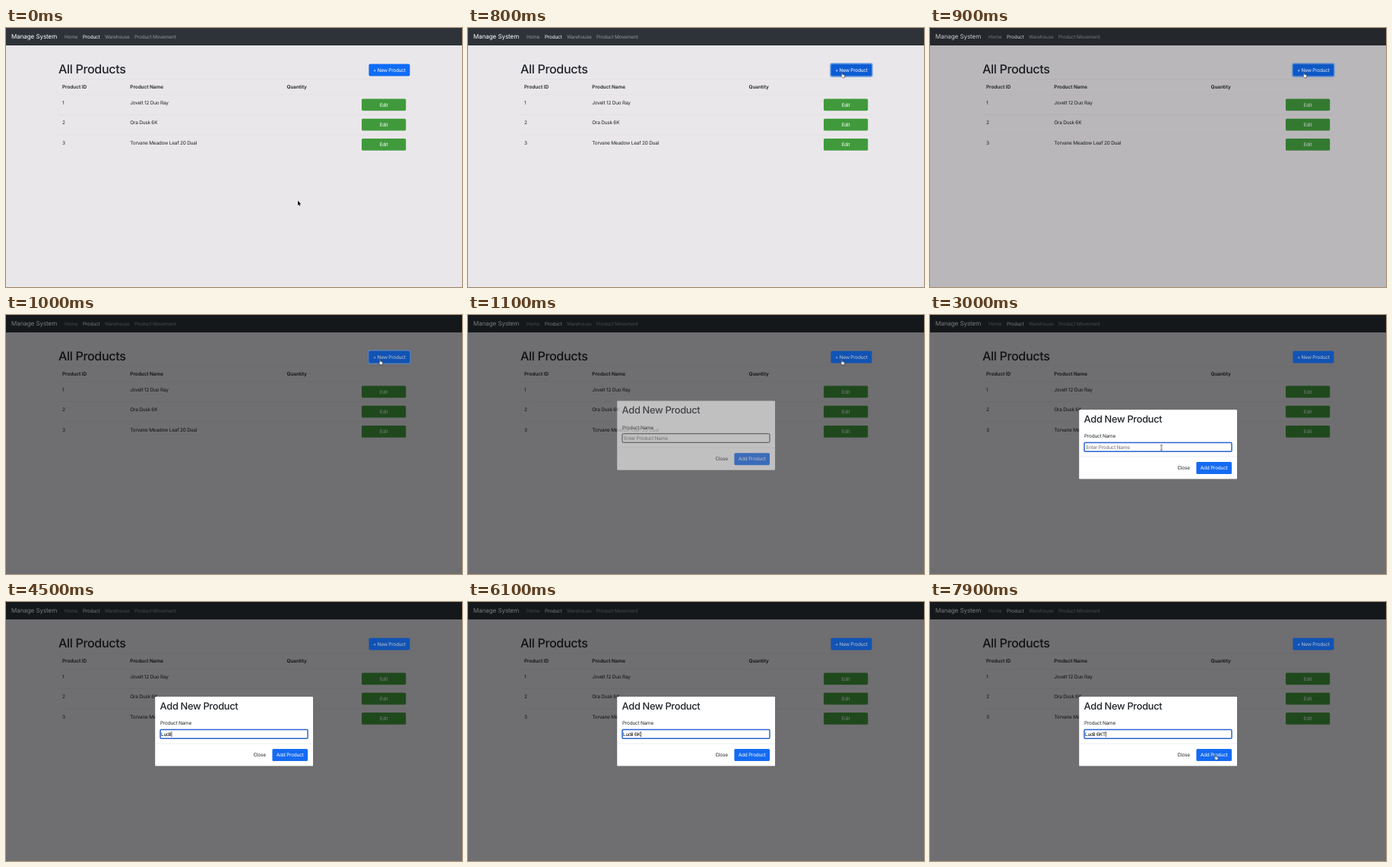
An HTML page for the animation above (8000 ms loop, 600 px wide and 342 px high).

```html
<!DOCTYPE html>
<html lang="en">
<head>
<meta charset="utf-8">
<title>Manage System</title>
<style>
html, body { margin: 0; width: 100%; height: 100%; overflow: hidden; background: #e9e7ea; }
svg { display: block; width: 100vw; height: 100vh; }
text {
  font: 400 6.45px Inter, "Open Sans", sans-serif;
  letter-spacing: -.21px;
  fill: #212529;
  text-rendering: geometricPrecision;
  white-space: pre;
}
.brand { font-size: 8.05px; letter-spacing: -.08px; fill: #fff; }
.link { fill: #92969a; }
.light { fill: #fff; }
.mid { text-anchor: middle; }
.head { font-weight: 600; letter-spacing: -.05px; }
.h1 { font-size: 16.1px; font-weight: 500; letter-spacing: -.35px; }
.h2 { font-size: 12.9px; font-weight: 500; letter-spacing: -.35px; }
.rule { stroke: #d9d8dc; stroke-width: .5; }
.edit { fill: #409a3c; }

#backdrop, #modal, #new rect, #new text, #field, #cursor, #cursor path {
  animation: 8s linear infinite;
}
#backdrop { animation-name: dim; }
#modal { animation-name: drop; }
#new .face { animation-name: face; }
#new .ring { animation-name: ring; animation-timing-function: step-end; }
#new text { animation-name: label; }
#field { animation-name: focus; animation-timing-function: step-end; }
#cursor { animation-name: travel; animation-timing-function: ease-in-out; }
#cursor path { animation-timing-function: step-end; }
#cursor .arrow { animation-name: arrow; fill: #000; stroke: #fff; stroke-width: .7; paint-order: stroke; }
#cursor .hand { animation-name: hand; fill: #fff; stroke: #111; stroke-width: .55; }
#cursor .beam { animation-name: beam; fill: none; stroke: #111; stroke-width: .7; }

@keyframes dim { 0%, 10.5% { opacity: 0 } 12.4%, 100% { opacity: .52 } }
@keyframes drop {
  0%, 13% { opacity: 0; transform: translateY(-21px); animation-timing-function: ease-out }
  14.9% { opacity: 1; transform: translateY(-5px); animation-timing-function: ease-out }
  16.8%, 100% { opacity: 1; transform: none }
}
@keyframes face {
  0%, 8.4% { fill: #0f6cf6 }
  9.8%, 10.5% { fill: #0c5cd4 }
  12.4%, 100% { fill: #1153b4 }
}
@keyframes ring { 0% { opacity: 0 } 10% { opacity: .7 } 13.6%, 100% { opacity: 0 } }
@keyframes label { 0%, 10.5% { fill: #fff } 12.4%, 100% { fill: #bcc3cf } }
@keyframes focus {
  0% { stroke: #222; stroke-width: .9px }
  27.5%, 100% { stroke: #2b63d2; stroke-width: 1.5px }
}
@keyframes travel {
  0%, 2% { transform: translate(384px, 228px) }
  9.5%, 13.6% { transform: translate(491px, 58.5px) }
  18.8%, 92.5% { transform: translate(304.5px, 175px); animation-timing-function: ease-in }
  94.5% { transform: translate(340px, 197px); animation-timing-function: linear }
  96.4% { transform: translate(371px, 217px); animation-timing-function: ease-out }
  98.2%, 100% { transform: translate(374.3px, 201.5px) }
}
@keyframes arrow {
  0% { opacity: 1 } 8.6% { opacity: 0 } 14% { opacity: 1 }
  17.5% { opacity: 0 } 92.6% { opacity: 1 } 97.2%, 100% { opacity: 0 }
}
@keyframes hand {
  0% { opacity: 0 } 8.6% { opacity: 1 } 14% { opacity: 0 } 97.2%, 100% { opacity: 1 }
}
@keyframes beam { 0% { opacity: 0 } 17.5% { opacity: 1 } 40%, 100% { opacity: 0 } }
</style>
</head>
<body>
<svg viewBox="0 0 600 342" preserveAspectRatio="none">
  <rect width="600" height="342" fill="#e9e7ea"/>
  <rect width="600" height="23" fill="#2d3338"/>
  <text class="brand" x="7" y="14.2">Manage System</text>
  <text class="link" x="77" y="14">Home</text>
  <text class="light" x="101" y="14">Product</text>
  <text class="link" x="130" y="14">Warehouse</text>
  <text class="link" x="169" y="14">Product Movement</text>

  <text class="h1" x="69" y="60.3">All Products</text>
  <path class="rule" d="M69 67.5H531M69 88H531M69 114.5H531M69 141H531"/>
  <g class="heads">
    <text class="head" x="74" y="80">Product ID</text>
    <text class="head" x="163.3" y="80">Product Name</text>
    <text class="head" x="369.5" y="80">Quantity</text>
  </g>
  <g id="rows"></g>

  <rect id="backdrop" width="600" height="342" fill="#000"/>

  <g id="new">
    <rect class="ring" x="476.8" y="46.8" width="55.2" height="17.4" rx="2" fill="none" stroke="#4d8ae0" stroke-width="1.4"/>
    <rect class="face" x="477.4" y="47.4" width="54" height="16" rx="1.6"/>
    <text class="mid" x="504.3" y="57.8">+ New Product</text>
  </g>

  <g id="modal">
    <rect x="196.2" y="125" width="207.8" height="91.6" rx="1.2" fill="#fff"/>
    <text class="h2" x="202.6" y="142.3">Add New Product</text>
    <text x="203" y="162.4">Product Name</text>
    <rect id="field" x="203" y="168.6" width="194" height="11.6" rx="1.3" fill="#fff"/>
    <text id="hint" x="205.3" y="176.7" style="fill:#6b6b6f">Enter Product Name</text>
    <text id="typed" x="204" y="176.7" style="fill:#000"></text>
    <rect id="caret" y="170.9" width=".6" height="7.4" fill="#000"/>
    <path d="M196.2 187H404" stroke="#dee2e6" stroke-width=".6"/>
    <text x="325.5" y="204.3">Close</text>
    <rect x="350.4" y="194" width="46.6" height="16" rx="1.6" fill="#156bf2"/>
    <text class="light mid" x="373.7" y="204.3">Add Product</text>
  </g>

  <g id="cursor">
    <path class="arrow" d="M0 0V6.2L1.4 4.9 2.3 7 3.2 6.6 2.3 4.6H4.2Z"/>
    <path class="hand" d="M1 0Q1.6 0 1.6 .7V2.8L4.4 3.4Q5 3.6 4.9 4.3L4.4 7H1.5L-.6 4.6Q-.3 3.8 .4 4.4V.7Q.4 0 1 0Z"/>
    <path class="beam" d="M-1.2-3.5Q0-3.5 0-2.8Q0-3.5 1.2-3.5M0-2.8V2.8M-1.2 3.5Q0 3.5 0 2.8Q0 3.5 1.2 3.5"/>
  </g>
</svg>
<script>
const $ = id => document.getElementById(id);
const products = ["Jovelt 12 Duo Ray", "Ora Dusk 6K", "Torvane Meadow Leaf 20 Dual"];
$("rows").innerHTML = products.map((name, i) => {
  const y = 101 + i * 26.3;
  return `<text x="74" y="${y}">${i + 1}</text>
    <text x="163.3" y="${y}">${name}</text>
    <rect class="edit" x="468" y="${y - 7.6}" width="58.2" height="15.8" rx="1.6"/>
    <text class="light mid" x="497" y="${y + 2.6}">Edit</text>`;
}).join("");

const LOOP = 8000, FOCUS = 2200;
const entry = "Ludil 6KT";
const keyTimes = [3200, 3650, 3950, 4200, 4400, 5000, 5450, 5900, 6850];
const typed = $("typed"), hint = $("hint"), caret = $("caret");
let start = null;

function draw(now) {
  start ??= now;
  const t = (now - start) % LOOP;
  const count = keyTimes.filter(k => k <= t).length;
  const text = entry.slice(0, count);
  if (typed.textContent !== text) typed.textContent = text;
  hint.style.display = count ? "none" : "";

  // The caret stays lit for half a second after each key, then blinks.
  const last = count ? keyTimes[count - 1] : FOCUS;
  const lit = t >= FOCUS && (t - last) % 1000 < 500;
  caret.style.opacity = lit || t > 7850 ? 1 : 0;
  caret.setAttribute("x", 204.2 + (count ? typed.getComputedTextLength() : 0));
  requestAnimationFrame(draw);
}
requestAnimationFrame(draw);
</script>
</body>
</html>
```
